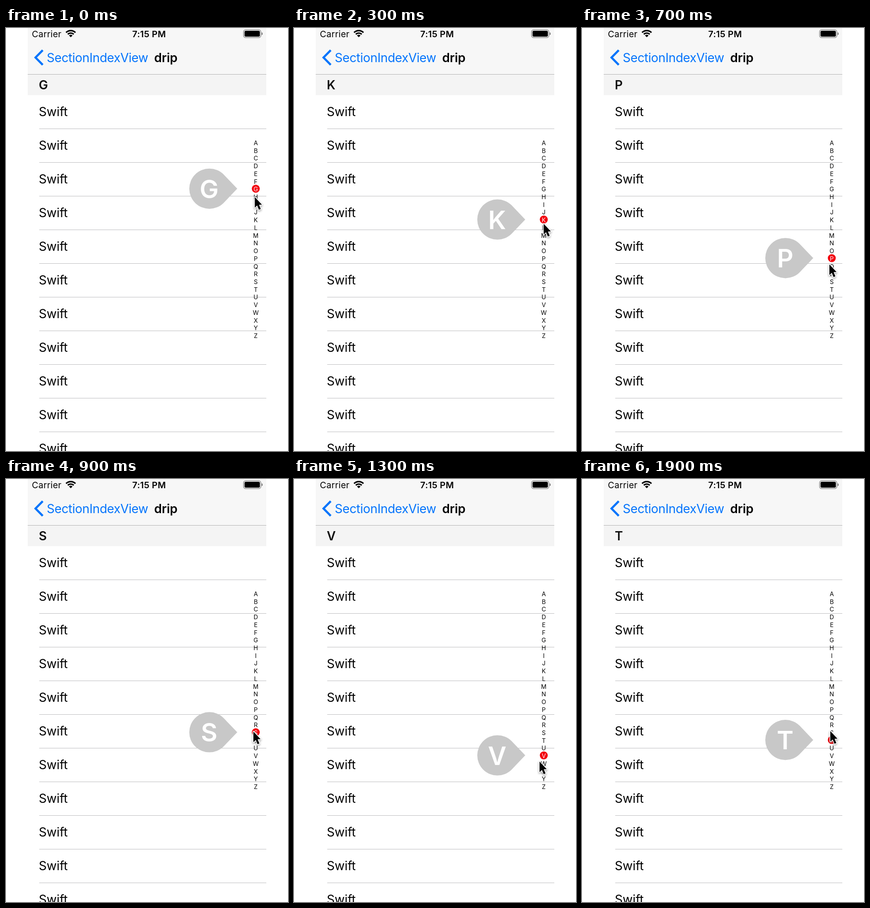
Write an HTML page with a canvas that moves like this. It is 611 px wide and 917 px high and loops after 2 s.

```html
<!DOCTYPE html>
<html lang="en">
<head>
<meta charset="utf-8">
<title>Section index</title>
<style>
  html, body { margin: 0; width: 100%; height: 100%; overflow: hidden; background: #fff; }
  canvas { display: block; }
</style>
</head>
<body>
<canvas id="stage" width="611" height="917"></canvas>
<script>
const ctx = document.getElementById('stage').getContext('2d');
const LOOP = 2000, STEP = 100;
const LEFT = 47, RIGHT = 564, INSET = 72;
const LETTERS = 'ABCDEFGHIJKLMNOPQRSTUVWXYZ';
const INDEX_X = 541.2, INDEX_Y = 248, PITCH = 16.72;
const BLUE = '#0474fc';

// Selected section at each step of the drag
const SELECTED = 'GHIKLMOPRSTUUVWWWVUT';

// Pointer path: time, x, y
const POINTER = [
  [0, 539, 366], [300, 541, 424], [700, 536, 512], [900, 536, 547],
  [1300, 532, 612], [1450, 532, 620], [1600, 534, 610], [1900, 538, 546]
];

function text(str, x, y, size, weight = 400, color = '#000', spacing = 0, align = 'left') {
  ctx.font = `${weight} ${size}px Inter, "Liberation Sans", sans-serif`;
  ctx.letterSpacing = spacing + 'px';
  ctx.textAlign = align;
  ctx.fillStyle = color;
  ctx.fillText(str, x, y);
}

function rect(x, y, w, h, color) {
  ctx.fillStyle = color;
  ctx.fillRect(x, y, w, h);
}

function roundRect(x, y, w, h, r) {
  ctx.beginPath();
  ctx.roundRect(x, y, w, h, r);
}

function circle(x, y, r, color) {
  ctx.fillStyle = color;
  ctx.beginPath();
  ctx.arc(x, y, r, 0, Math.PI * 2);
  ctx.fill();
}

function polyline(points) {
  ctx.beginPath();
  points.forEach(([x, y]) => ctx.lineTo(x, y));
}

function drawWifi(x, y) {
  const from = -Math.PI * 0.75, to = -Math.PI * 0.25;
  ctx.fillStyle = '#000';
  for (const [inner, outer] of [[0, 5.4], [7.4, 10.6], [12.7, 16]]) {
    ctx.beginPath();
    ctx.arc(x, y, outer, from, to);
    ctx.arc(x, y, inner, to, from, true);
    ctx.fill();
  }
}

function drawBattery() {
  ctx.strokeStyle = '#777';
  ctx.lineWidth = 1.3;
  roundRect(514.6, 3.9, 37.6, 17, 4.5);
  ctx.stroke();
  ctx.fillStyle = '#000';
  roundRect(516.8, 6, 33.2, 12.8, 2.5);
  ctx.fill();
  ctx.fillStyle = '#777';
  roundRect(553.9, 9.5, 2.1, 5.8, [0, 2, 2, 0]);
  ctx.fill();
}

function drawBars(section) {
  rect(LEFT, 0, RIGHT - LEFT, 100, '#f7f7f7');
  rect(LEFT, 101, RIGHT - LEFT, 44.5, '#f4f4f4');
  rect(LEFT, 100, RIGHT - LEFT, 1, '#b4b4b4');

  text('Carrier', 56, 19.5, 19, 400, '#000', 0.3);
  drawWifi(140.3, 20);
  text('7:15 PM', 310, 19.5, 19, 600, '#000', 0.35, 'center');
  drawBattery();

  ctx.strokeStyle = BLUE;
  ctx.lineWidth = 4.6;
  polyline([[79.6, 48.2], [64, 64], [79.6, 79.8]]);
  ctx.stroke();
  text('SectionIndexView', 88.2, 74, 26.7, 400, BLUE, -0.35);
  text('drip', 321, 74, 26.7, 600, '#000', -0.1);
  text(section, 71, 133.3, 26.7, 600, '#111');
}

function drawRows() {
  for (let i = 0; i < 11; i++) {
    text('Swift', 71, 190.6 + 73 * i, 26.7, 400, '#000', -0.1);
    rect(INSET, 218 + 73 * i, RIGHT - INSET, 1, '#bebec0');
  }
}

function drawIndex(selected) {
  circle(INDEX_X, INDEX_Y + PITCH * selected, 8.6, '#f2000c');
  [...LETTERS].forEach((letter, i) => {
    const color = i === selected ? '#fff' : '#000';
    text(letter, INDEX_X, INDEX_Y + 6 + PITCH * i, 13, 400, color, 0, 'center');
  });
}

function drawDrip(letter, y) {
  const x = 440.7, r = 43.6, a = Math.PI / 4;
  ctx.fillStyle = '#c8c8c8';
  ctx.beginPath();
  ctx.arc(x, y, r, a, -a);
  ctx.lineTo(501, y);
  ctx.fill();
  text(letter, x - 0.5, y + 20.5, 55, 600, '#fff', 0, 'center');
}

function pointerAt(t) {
  const next = POINTER.findIndex(p => p[0] >= t);
  const b = POINTER[next], a = POINTER[Math.max(next - 1, 0)];
  const k = b === a ? 0 : (t - a[0]) / (b[0] - a[0]);
  return [a[1] + (b[1] - a[1]) * k, a[2] + (b[2] - a[2]) * k];
}

function drawPointer([x, y]) {
  ctx.save();
  ctx.translate(x, y);
  polyline([[0, 0.5], [0, 23.5], [5.2, 18.8], [9, 28], [13, 26.3], [9.2, 17.3], [15.6, 17]]);
  ctx.closePath();
  ctx.lineJoin = 'round';
  ctx.lineWidth = 3;
  ctx.strokeStyle = '#fff';
  ctx.shadowColor = 'rgba(0,0,0,.4)';
  ctx.shadowBlur = 4;
  ctx.shadowOffsetY = 2;
  ctx.stroke();
  ctx.shadowColor = 'transparent';
  ctx.fillStyle = '#000';
  ctx.fill();
  ctx.restore();
}

function draw(now) {
  const step = Math.floor((now % LOOP) / STEP);
  const letter = SELECTED[step];
  const selected = LETTERS.indexOf(letter);

  rect(0, 0, 611, 917, '#fff');
  drawBars(letter);
  drawRows();
  drawIndex(selected);
  drawDrip(letter, INDEX_Y + PITCH * selected);
  drawPointer(pointerAt(step * STEP));
}

const start = performance.now();
function tick() {
  draw(performance.now() - start);
  requestAnimationFrame(tick);
}
tick();
</script>
</body>
</html>
```
